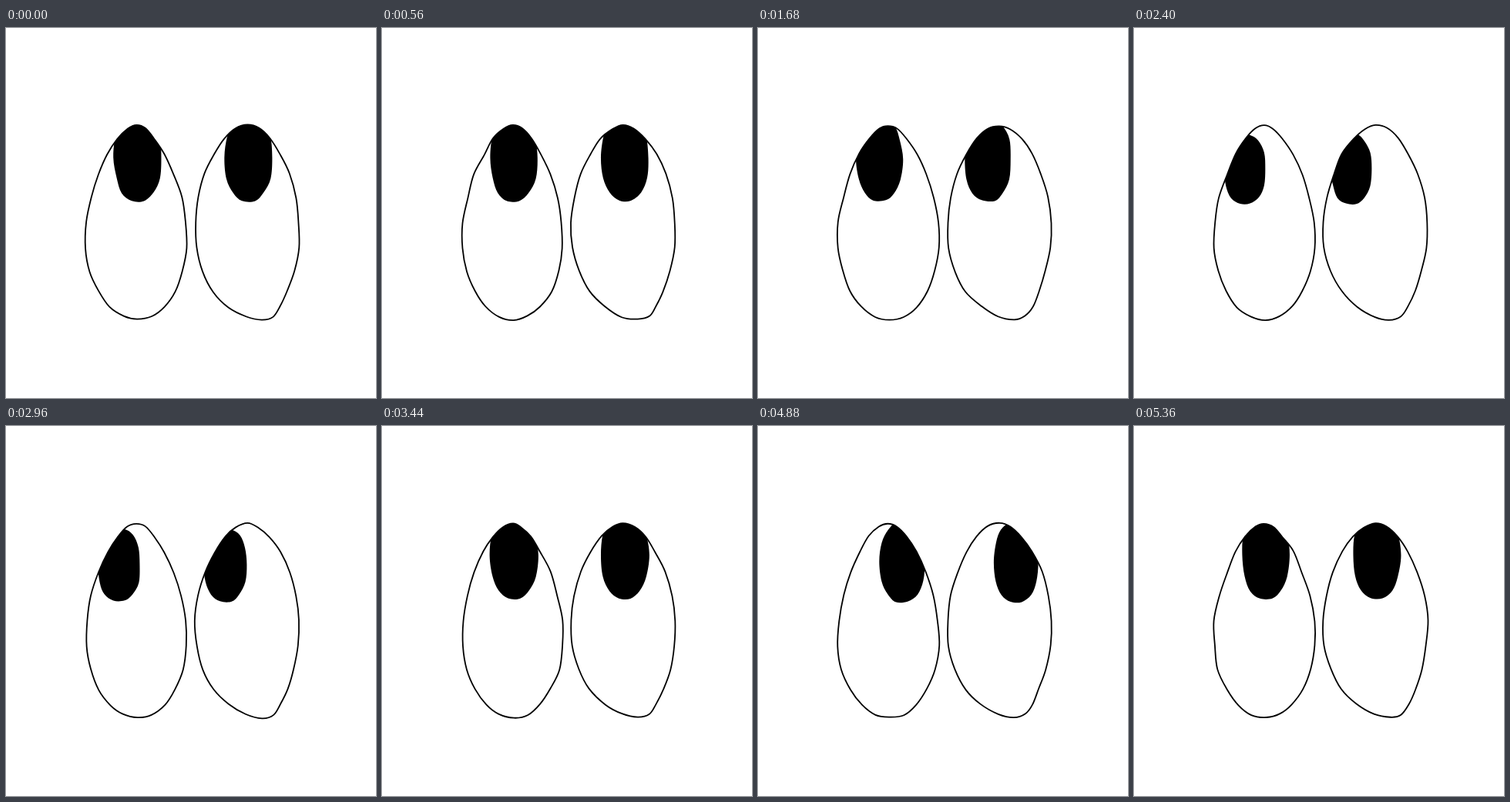
These frames come from a looping animation (480 px wide and 480 px high, 5440 ms). An HTML page with a canvas:

```html
<!DOCTYPE html>
<html lang="en">
<head>
<meta charset="utf-8">
<title>Looking eyes</title>
<style>
  html, body { margin: 0; width: 100%; height: 100%; overflow: hidden; background: #fff; }
  canvas { display: block; width: 480px; height: 480px; }
</style>
</head>
<body>
<canvas id="stage" width="480" height="480"></canvas>
<script>
const ctx = document.getElementById('stage').getContext('2d');
const STEP = 80, LOOP = 5440;
const TOP = 126.5, HEIGHT = 252;

// taper narrows the top, lean pulls the bottom tip sideways, reach is the pupil's travel
const EYES = [
  { x: 169, width: 64.5, taper: 0.2, lean: 2, reach: 27 },
  { x: 313, width: 67.5, taper: 0.08, lean: 19, reach: 33 }
];

function ramp(t, from, to) {
  const u = Math.min(1, Math.max(0, (t - from) / (to - from)));
  return u * u * (3 - 2 * u);
}

// -1 looks left, 0 up, 1 right
const gazeAt = t =>
  2 * ramp(t, 2800, 4080) - ramp(t, 1200, 2160) - ramp(t, 4640, 5200);

function seeded(seed) {
  let s = seed >>> 0;
  return () => {
    s = (s + 0x6D2B79F5) >>> 0;
    let n = Math.imul(s ^ (s >>> 15), s | 1);
    n ^= n + Math.imul(n ^ (n >>> 7), n | 61);
    return ((n ^ (n >>> 14)) >>> 0) / 4294967296;
  };
}

// Closed, shaky Catmull-Rom curve through count points of a shape.
function sketch(shape, count, shake, rand) {
  const jitter = v => v + (rand() * 2 - 1) * shake;
  const points = Array.from({ length: count },
    (_, i) => shape(i / count * Math.PI * 2).map(jitter));
  const at = i => points[(i + count) % count];
  const path = new Path2D();
  path.moveTo(...at(0));
  for (let i = 0; i < count; i++) {
    const [a, b, c, d] = [at(i - 1), at(i), at(i + 1), at(i + 2)];
    path.bezierCurveTo(
      b[0] + (c[0] - a[0]) / 6, b[1] + (c[1] - a[1]) / 6,
      c[0] - (d[0] - b[0]) / 6, c[1] - (d[1] - b[1]) / 6, c[0], c[1]);
  }
  path.closePath();
  return path;
}

const egg = ({ x, width, taper, lean }) => a => {
  const c = Math.cos(a), down = (1 - c) / 2;
  const half = width * Math.sin(a) * (1 - taper * c - 0.1 * c * c);
  return [x + lean * down ** 10 + half, TOP + HEIGHT * down];
};

// Slightly squared oval that sinks and shrinks as it turns aside.
const pupil = ({ x, reach }, gaze) => {
  const side = gaze * gaze;
  const cx = x + 2 + reach * gaze, cy = 168 + 18 * side + 3 * gaze;
  const rx = 31 - 4 * side, ry = 57 - 11 * side;
  const bend = v => Math.sign(v) * Math.abs(v) ** 0.9;
  return a => [cx + rx * bend(Math.cos(a)), cy + ry * bend(Math.sin(a))];
};

function draw(frame) {
  const rand = seeded(frame * 7919 + 17);
  const gaze = gazeAt(frame * STEP);
  ctx.clearRect(0, 0, 480, 480);
  ctx.lineWidth = 1.8;
  ctx.lineJoin = 'round';
  for (const eye of EYES) {
    const edge = sketch(egg(eye), 24, 1.1, rand);
    ctx.save();
    ctx.clip(edge);
    ctx.fill(sketch(pupil(eye, gaze), 14, 0.9, rand));
    ctx.restore();
    ctx.stroke(edge);
  }
}

const start = performance.now();
let shown = -1;
function tick() {
  const frame = Math.floor((performance.now() - start) % LOOP / STEP);
  if (frame !== shown) draw(shown = frame);
  requestAnimationFrame(tick);
}
tick();
</script>
</body>
</html>
```
